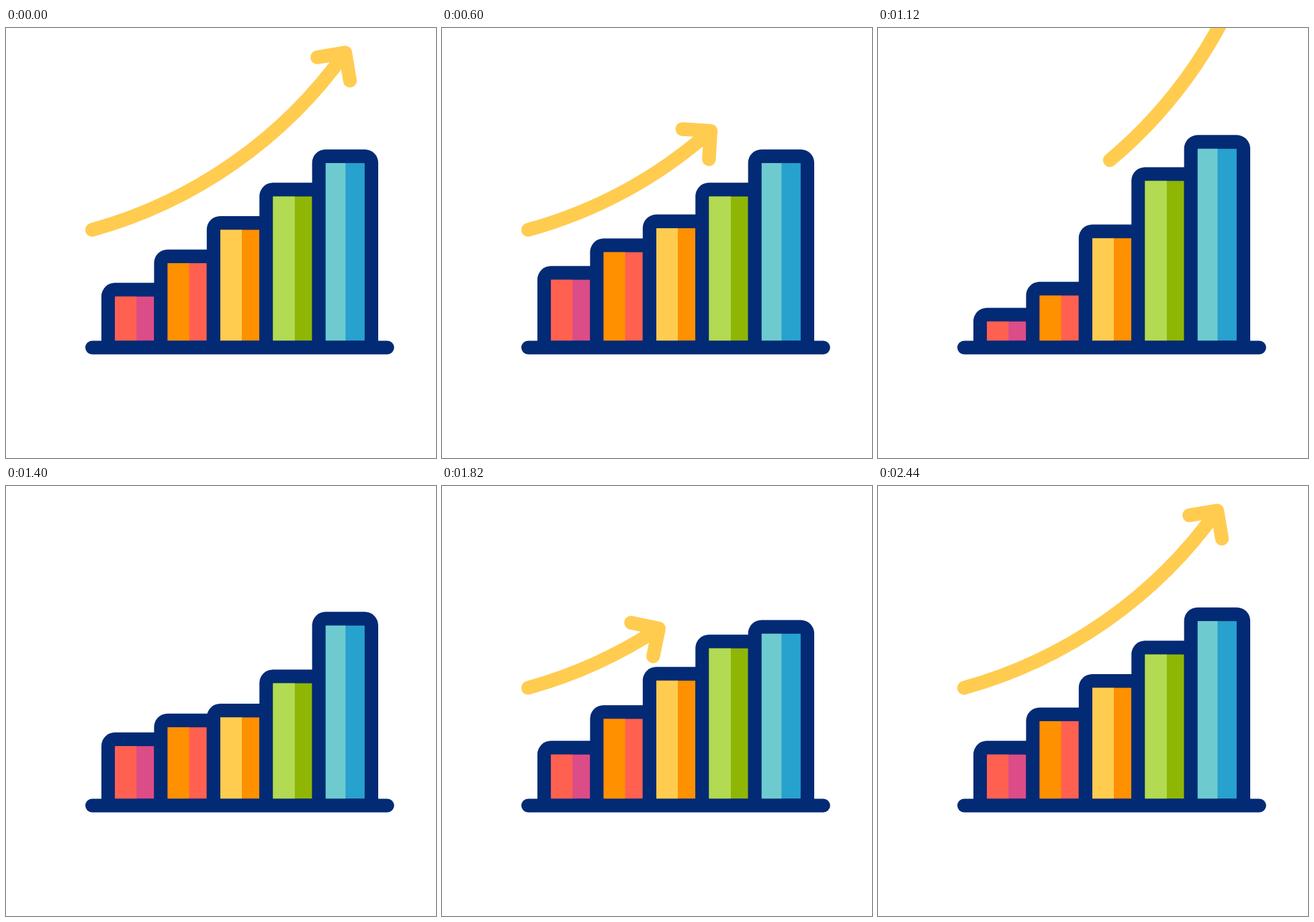
Write an HTML page with a canvas that moves like this. It is 640 px wide and 640 px high and loops after 3000 ms.

```html
<!DOCTYPE html>
<html lang="en">
<head>
<meta charset="utf-8">
<title>Growth chart</title>
<style>
  html, body { margin: 0; width: 100%; height: 100%; overflow: hidden; background: #fff; }
  canvas { display: block; width: 640px; height: 640px; }
</style>
</head>
<body>
<canvas id="stage" width="640" height="640"></canvas>
<script>
const ctx = document.getElementById('stage').getContext('2d');
const LOOP = 3000, STEP = 20;
const NAVY = '#032a74', YELLOW = '#ffcc50';
const BASE_Y = 475.6, LINE = 20.4;

const BARS = [
  { delay: 200, split: 32, light: '#ff6050', dark: '#dc4c87' },
  { delay: 360, split: 32, light: '#ff9000', dark: '#ff6050' },
  { delay: 520, split: 32, light: '#ffcc50', dark: '#ff9000' },
  { delay: 680, split: 32.5, light: '#b2da52', dark: '#90b605' },
  { delay: 820, split: 29.5, light: '#6dcbcf', dark: '#27a1ce' }
].map((bar, i) => ({ ...bar, x: 142 + 78.4 * i, top: 379.3 - 49.65 * i }));

// The arrow runs along a circle; headings are in degrees above the horizontal.
const ARC = { x: -56, y: -363.5, r: 689 };
const TAIL = 15.5, REST = 54.5, SHORT = 38.4;

const rad = deg => deg * Math.PI / 180;
const clamp = v => Math.min(1, Math.max(0, v));
const mix = (a, b, k) => a + (b - a) * k;
const easeInOut = p => (1 - Math.cos(Math.PI * clamp(p))) / 2;
const easeIn = p => 1 - Math.cos(Math.PI / 2 * clamp(p));

// Four equal swings: up, down, slight overshoot, rest.
function bounce(t) {
  const keys = [0, 25, -50, 12.5, 0], span = 400;
  const i = Math.min(3, Math.max(0, Math.floor(t / span)));
  return mix(keys[i], keys[i + 1], easeInOut(t / span - i));
}

function onArc(center, heading) {
  const a = rad(heading);
  return { x: center.x + ARC.r * Math.sin(a), y: center.y + ARC.r * Math.cos(a) };
}

function arrowPose(t) {
  if (t < 760) {
    return { tail: TAIL, tip: mix(REST, SHORT, easeInOut((t - 200) / 560)), tilt: 0 };
  }
  if (t < 1340) {
    const e = easeIn((t - 760) / 580);
    return { tail: TAIL + 45.8 * e, tip: SHORT + 66 * e, tilt: 10 * e };
  }
  if (t < 1410) return null;
  const left = Math.max(0, 2440 - t);
  return { tail: TAIL, tip: REST - 0.0388 * (Math.hypot(left, 80) - 80), tilt: 0 };
}

function drawArrow(t) {
  const pose = arrowPose(t);
  if (!pose) return;
  const start = onArc(ARC, pose.tail);
  const from = pose.tail + pose.tilt, to = pose.tip + pose.tilt;
  const center = {
    x: start.x - ARC.r * Math.sin(rad(from)),
    y: start.y - ARC.r * Math.cos(rad(from))
  };
  const tip = onArc(center, to);
  const barb = side => {
    const a = rad(to + 180 + side * 45);
    return [tip.x + 42.3 * Math.cos(a), tip.y - 42.3 * Math.sin(a)];
  };
  ctx.strokeStyle = YELLOW;
  ctx.lineWidth = LINE;
  ctx.lineCap = ctx.lineJoin = 'round';
  ctx.beginPath();
  ctx.arc(center.x, center.y, ARC.r, rad(90 - from), rad(90 - to), true);
  ctx.moveTo(...barb(-1));
  ctx.lineTo(tip.x, tip.y);
  ctx.lineTo(...barb(1));
  ctx.stroke();
}

function drawBars(t) {
  const tops = BARS.map(bar => bar.top - bounce(t - bar.delay));
  ctx.fillStyle = NAVY;
  BARS.forEach((bar, i) => {
    const last = i === BARS.length - 1;
    ctx.beginPath();
    ctx.roundRect(bar.x, tops[i], last ? 98.4 : 88.4, BASE_Y - tops[i], [20, last ? 20 : 0, 0, 0]);
    ctx.fill();
  });
  BARS.forEach((bar, i) => {
    const x = bar.x + 20.2, y = tops[i] + LINE, h = BASE_Y - LINE / 2 - y;
    ctx.fillStyle = bar.dark;
    ctx.fillRect(x, y, 58, h);
    ctx.fillStyle = bar.light;
    ctx.fillRect(x, y, bar.split, h);
  });
  ctx.strokeStyle = NAVY;
  ctx.lineWidth = LINE;
  ctx.lineCap = 'round';
  ctx.beginPath();
  ctx.moveTo(128.2, BASE_Y);
  ctx.lineTo(567.5, BASE_Y);
  ctx.stroke();
}

function render(now) {
  const t = Math.floor((now % LOOP) / STEP) * STEP;
  ctx.fillStyle = '#fff';
  ctx.fillRect(0, 0, 640, 640);
  drawBars(t);
  drawArrow(t);
}

let startTime = null;
function tick() {
  const now = performance.now();
  if (startTime === null) startTime = now;
  render(now - startTime);
  requestAnimationFrame(tick);
}
tick();
</script>
</body>
</html>
```
